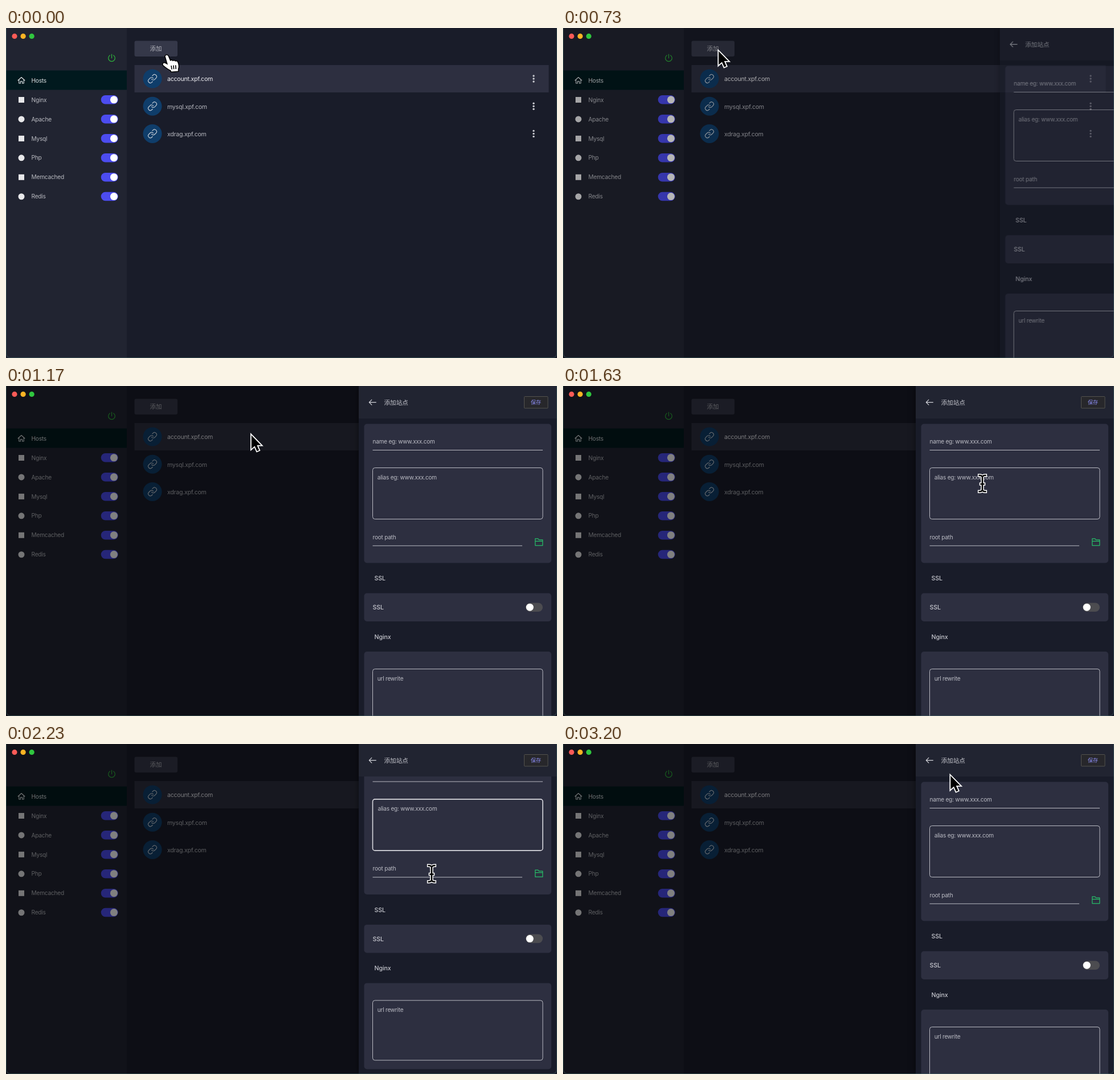
An HTML page with a canvas for the animation above (3.23 s loop, 967x579 px).

```html
<!DOCTYPE html>
<html lang="zh">
<head>
<meta charset="utf-8">
<title>Hosts</title>
<style>
html, body { margin: 0; width: 100%; height: 100%; overflow: hidden; background: #191c29; }
canvas { display: block; width: 967px; height: 579px; }
</style>
</head>
<body>
<canvas id="stage" width="967" height="579"></canvas>
<script>
const W = 967, H = 579, LOOP = 3230;
const SANS = 'Inter, Roboto, "Noto Sans CJK SC", "Noto Sans CJK", sans-serif';
const CJK = '"Noto Sans CJK SC", "Noto Sans CJK", sans-serif';
const stage = document.getElementById('stage').getContext('2d');
const sheet = document.createElement('canvas');
sheet.width = W;
sheet.height = H;
const layer = sheet.getContext('2d');
let g = stage;

const clamp = v => Math.max(0, Math.min(1, v));
const span = (t, a, b) => clamp((t - a) / (b - a));
const mix = (a, b, p) => a + (b - a) * p;
const smooth = p => p * p * (3 - 2 * p);

// CSS "ease": cubic-bezier(.25, .1, .25, 1)
function ease(x) {
  let lo = 0, hi = 1, s = x;
  for (let i = 0; i < 20; i++) {
    s = (lo + hi) / 2;
    const bx = .75 * s * (1 - s) * (1 - s) + .75 * s * s * (1 - s) + s ** 3;
    if (bx < x) lo = s; else hi = s;
  }
  return .3 * s * (1 - s) * (1 - s) + 3 * s * s * (1 - s) + s ** 3;
}

function rect(x, y, w, h, color, r = 0) {
  g.fillStyle = color;
  g.beginPath();
  g.roundRect(x, y, w, h, r);
  g.fill();
}

function frame(x, y, w, h, color, width = 1, r = 4) {
  g.strokeStyle = color;
  g.lineWidth = width;
  g.beginPath();
  g.roundRect(x, y, w, h, r);
  g.stroke();
}

function dot(x, y, r, color) {
  g.fillStyle = color;
  g.beginPath();
  g.arc(x, y, r, 0, 7);
  g.fill();
}

function text(str, x, y, size, color, o = {}) {
  g.font = `${o.weight || 400} ${size}px ${o.family || SANS}`;
  g.letterSpacing = (o.gap ?? -.25) + 'px';
  g.textAlign = o.align || 'left';
  g.fillStyle = color;
  g.fillText(str, x, y);
}

function icon(d, x, y, color, width = 1, scale = 1) {
  g.save();
  g.translate(x, y);
  g.scale(scale, scale);
  g.strokeStyle = color;
  g.lineWidth = width / scale;
  g.lineCap = g.lineJoin = 'round';
  g.stroke(new Path2D(d));
  g.restore();
}

function toggle(x, y, on) {
  rect(x, y, 30, 15.5, on ? '#4c4cf0' : '#4c4c50', 7.75);
  dot(on ? x + 22.7 : x + 7.3, y + 7.75, 6.5, '#fff');
}

const HOME = 'M-6 0L0-5.5L6 0M-4.2-1.2V5H-1.5V1.5H1.5V5H4.2V-1.2';
const LINK = 'M10 13a5 5 0 0 0 7.54.54l3-3a5 5 0 0 0-7.07-7.07l-1.72 1.71' +
  'M14 11a5 5 0 0 0-7.54-.54l-3 3a5 5 0 0 0 7.07 7.07l1.71-1.71';
const POWER = 'M-3.2-4.8A5.8 5.8 0 1 0 3.2-4.8M0-6.6V0';
const BACK = 'M6 0H-6M-1.5-4.5L-6 0L-1.5 4.5';
const FOLDER = 'M-6.5 6V-6H-1.5L0-4H6.5V6ZM-6.5-1.5H6.5';

const services = ['Nginx', 'Apache', 'Mysql', 'Php', 'Memcached', 'Redis'];
const sites = ['account.xpf.com', 'mysql.xpf.com', 'xdrag.xpf.com'];

function drawSidebar() {
  rect(0, 0, 212, H, '#212431');
  icon(POWER, 185.5, 52.7, '#2fb43c', 1.2);
  rect(0, 74.5, 212, 34, '#01191e');
  icon(HOME, 27, 92, '#e6e8ea', 1.1);
  text('Hosts', 44.5, 95.6, 10.2, '#dfe2e4');
  services.forEach((name, i) => {
    const y = 126 + i * 33.95;
    if (i % 2) dot(27, y, 5.5, '#e8e8ea');
    else rect(22, y - 5, 10, 10, '#e8e8ea');
    text(name, 44.5, y + 3.6, 10.2, '#b9bac0');
    toggle(166.7, y - 7.9, true);
  });
}

function drawList() {
  rect(212, 0, W - 212, H, '#191c29');
  rect(225.5, 22.5, 75.5, 27.5, '#353849', 3);
  text('添加', 263, 40.3, 10.5, '#b4b5bd', { family: CJK, align: 'center', gap: 0 });
  rect(225.5, 65, 727, 48, '#2d2f40');
  sites.forEach((name, i) => {
    const y = 89 + i * 48.2;
    dot(257, y, 16.5, '#0f3d6a');
    icon(LINK, 257 - 12 * .74, y - 12 * .74, '#c3cbd4', 1.2, .74);
    text(name, 283, y + 4.4, 10.6, i ? '#b4b5bc' : '#eeeef2');
    for (const k of [-5, 0, 5]) dot(926, y + k, 1.7, '#c9cad0');
  });
}

function underline(x, y, w, bold) {
  rect(x, bold ? y - .5 : y, w, bold ? 1.6 : 1, bold ? '#e6e6ea' : '#b9bac2');
}

function area(label, y, h, bold) {
  frame(643.5, y, 298.5, h, bold ? '#d8d8de' : '#b9bac2', bold ? 1.6 : 1);
  text(label, bold ? 652.5 : 651.8, y + 20.3, 10.1, '#bbbcc4');
}

function drawDrawer(scroll, focus) {
  const card = '#2d2f40', hint = '#bbbcc4';
  const title = { weight: 500, gap: -.1 };
  g.clearRect(0, 0, W, H);
  g.save();
  g.shadowColor = 'rgba(0,0,0,.5)';
  g.shadowBlur = 10;
  rect(619, 0, 348, H, '#191c29');
  g.restore();

  g.save();
  g.beginPath();
  g.rect(619, 57, 348, H - 57);
  g.clip();
  g.translate(0, -scroll);
  rect(628.5, 66.5, 328.5, 244, card, 5);
  text('name eg: www.xxx.com', 643.5, 101, 10.1, hint);
  underline(643.5, 112, 298.5, false);
  area('alias eg: www.xxx.com', 143.5, 90, focus === 'alias');
  text('root path', 643.5, 268.6, 10.1, hint);
  underline(643.5, 279.8, 262.5, focus === 'root');
  icon(FOLDER, 935.3, 273.8, '#27c069', 1.2);
  text('SSL', 646.5, 341.4, 10.6, '#c6c7ce', title);
  rect(628.5, 363.5, 328.5, 49.5, card, 5);
  text('SSL', 643.5, 392.4, 10.6, '#c6c7ce', title);
  toggle(912, 380.4, false);
  text('Nginx', 646.5, 444, 10.6, '#c6c7ce', title);
  rect(628.5, 466, 328.5, 151, card, 5);
  area('url rewrite', 496.5, 105, false);
  g.restore();

  rect(619, 0, 348, 57, '#212431');
  icon(BACK, 643.3, 28.7, '#d3d4da', 1.2);
  text('添加站点', 663.5, 32.8, 10.6, '#c3c4cb', { family: CJK, gap: 0 });
  rect(909, 18, 42, 21, '#27272b');
  frame(909.5, 18.5, 41.5, 20.5, '#53524e', 1, 1);
  text('保存', 930, 32, 9.1, '#8d8ef6', { family: CJK, align: 'center', gap: 0 });
}

const ARROW = new Path2D('M2.2 4.8V28.6L8 23.4L12 32.4L15.6 30.9L11.8 22H19Z');
const HAND = new Path2D('M.6 2.6C1.6.2 4.4.2 5.6 2.6L9.2 11C10.6 9.4 13 9.8 13.6 11.4' +
  'C15 10 17.2 10.4 18 12C19.6 11 21.6 11.6 22.2 13.4C23.8 17.6 24.4 21.2 22.8 25L23 28.6' +
  'L11.2 29.4L10.6 27.4C6.4 25.6 2 22.4-2.6 18.6C-4.8 16-2 13.4.8 15.2L5 17.4Z');
const CREASES = new Path2D('M11 19L12 25.5M14.8 18.5L15.6 25.2M18.6 18.2L19.2 25');
const BEAM = new Path2D('M-5.3-14.3Q-.6-14.3 0-11V11Q-.6 14.3-5.3 14.3' +
  'M5.3-14.3Q.6-14.3 0-11M5.3 14.3Q.6 14.3 0 11M-2.5 1H2.5');

function trace(path, color, width) {
  g.strokeStyle = color;
  g.lineWidth = width;
  g.stroke(path);
}

function drawCursor(kind, x, y) {
  g.save();
  g.translate(x, y);
  g.lineJoin = 'round';
  if (kind === 'beam') {
    g.lineCap = 'square';
    trace(BEAM, '#fff', 5.6);
    trace(BEAM, '#000', 2.6);
  } else if (kind === 'hand') {
    trace(HAND, '#000', 3);
    g.fillStyle = '#fff';
    g.fill(HAND);
    trace(CREASES, '#000', 1.6);
  } else {
    g.lineJoin = 'miter';
    trace(ARROW, '#fff', 3.6);
    g.fillStyle = '#000';
    g.fill(ARROW);
  }
  g.restore();
}

// time in ms, x, y
const route = [
  [0, 279, 47], [60, 279, 47], [380, 271, 36], [960, 271, 36], [1500, 736, 171],
  [1690, 736, 171], [1900, 747, 227.5], [2880, 747, 227.5], [3130, 678, 51], [LOOP, 678, 51]
];

function pointer(t) {
  let i = 1;
  while (i < route.length - 1 && t >= route[i][0]) i++;
  const [a, b] = [route[i - 1], route[i]];
  const p = smooth(span(t, a[0], b[0]));
  return [mix(a[1], b[1], p), mix(a[2], b[2], p)];
}

function cursorKind(t, x, y, scroll) {
  if (t < 600) return 'hand';
  const top = y + scroll;
  const inside = (a, b) => top > a && top < b;
  const field = inside(86, 113) || inside(143, 234) || inside(254, 281);
  return x > 643 && x < 942 && field ? 'beam' : 'arrow';
}

function draw(t) {
  const open = ease(span(t, 631, 931));
  const scroll = 46.6 * (smooth(span(t, 1930, 2110)) - smooth(span(t, 2710, 2868)));
  const focus = t >= 1665 && t < 2700 ? 'alias' : t >= 2700 && t < 3150 ? 'root' : '';

  g = stage;
  g.clearRect(0, 0, W, H);
  drawSidebar();
  drawList();
  if (open > 0) {
    rect(0, 0, W, H, `rgba(0,0,0,${.5 * open})`);
    g = layer;
    drawDrawer(scroll, focus);
    g = stage;
    g.globalAlpha = open;
    g.drawImage(sheet, 348 * (1 - open), 0);
    g.globalAlpha = 1;
  }
  ['#fc5b57', '#fdb324', '#30c63f'].forEach((c, i) => dot(15 + i * 15.1, 14.4, 4.6, c));
  frame(.5, -8, W - 1, H + 7.5, 'rgba(70,110,110,.55)', 1, 7);
  const [x, y] = pointer(t);
  drawCursor(cursorKind(t, x, y, scroll), x, y);
}

const start = performance.now();
function tick() {
  draw((performance.now() - start) % LOOP);
  requestAnimationFrame(tick);
}
tick();
</script>
</body>
</html>
```
